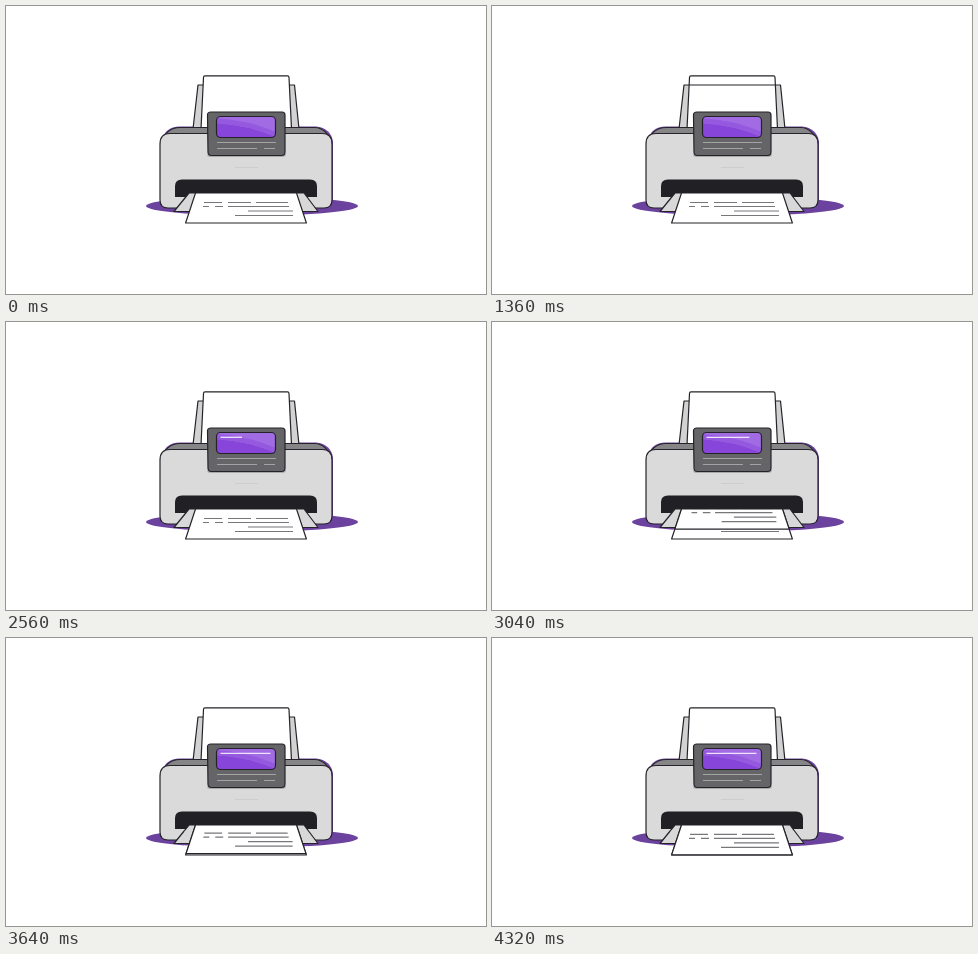
Write an HTML page that moves like this. It is 480 px wide and 288 px high and loops after 4.8 s.

```html
<!DOCTYPE html>
<html lang="en">
<head>
<meta charset="utf-8">
<title>Printer</title>
<style>
  html, body { margin: 0; width: 100%; height: 100%; overflow: hidden; background: #fff; }
  svg { display: block; width: 480px; height: 288px; }
  .ink { stroke: #252329; stroke-width: 1.2; stroke-linejoin: round; }
</style>
</head>
<body>
<svg viewBox="0 0 480 288" fill="none">
  <clipPath id="below"><path d="M150 187H330V230H150Z"/></clipPath>
  <clipPath id="glass"><rect x="210.5" y="110.5" width="59" height="21" rx="4"/></clipPath>

  <ellipse cx="246" cy="200" rx="106" ry="9.5" fill="#6c429f"/>
  <path d="M156 195V135Q158 121 174 120.500H310Q325 122 327 136V196Q326 204 319 205H165Z" fill="#6c429f"/>

  <!-- rear tray and blank paper -->
  <path class="ink" fill="#d2d2d3" d="M192 79H288.500L293 123H187Z"/>
  <path class="ink" fill="#fff" d="M199 69.800H281.500Q283 69.800 283 71.500L285.500 123H195L197.500 71.500Q197.500 69.800 199 69.800Z"/>
  <path id="feed" class="ink"/>

  <!-- body -->
  <path class="ink" fill="#858587" d="M154.500 138Q160 121.500 174 121.500H309Q321 122 325.500 138Z"/>
  <path class="ink" fill="#dadadb" d="M154 138Q154 127.500 164 127.500H316Q326 127.500 326 138V194Q326 202 318 202H162Q154 202 154 194Z"/>
  <path d="M229 161.500H252" stroke="#cdcdce"/>

  <!-- control panel -->
  <path d="M201 148.500Q201 151 205 151H276Q280 151 280 148Z" fill="#aaa"/>
  <path class="ink" fill="#656567" d="M205 106H276Q279 106 279 109V146Q279 149.500 275.500 149.500H205.500Q202 149.500 202 146L201.500 109Q201.500 106 205 106Z"/>
  <g clip-path="url(#glass)">
    <path d="M210 110H270V132H210Z" fill="#8746d9"/>
    <path d="M210 110H270V131Q242 119 210 117Z" fill="#a06be3"/>
    <path d="M210 117Q242 119 270 131V126Q242 114 210 112Z" fill="#9559df"/>
  </g>
  <rect class="ink" x="210.500" y="110.500" width="59" height="21" rx="4"/>
  <path id="status" stroke="#eee3fb" stroke-width="1.300"/>
  <path d="M211 136.500H270M211 142.500H251M258 142.500H269" stroke="#a4a4a6"/>

  <!-- output slot and tray -->
  <path d="M169 191V180Q169 173.500 176 173.500H304Q311 173.500 311 180V191Z" fill="#202025"/>
  <path class="ink" fill="#d8d8d9" d="M183 187H298L312 205.500H168Z"/>
  <g id="old" clip-path="url(#below)"></g>
  <g id="new" clip-path="url(#below)"></g>
</svg>
<script>
const LOOP = 4800;
const $ = id => document.getElementById(id);
const clamp = v => Math.min(1, Math.max(0, v));
const halfWidth = y => 50.5 + (y - 187) * 0.33;

// Rows of writing on the sheet: y, then start and end of each dash
const rows = [
  [196.5, 198, 216, 222, 245, 250, 282],
  [200.5, 197, 203, 209, 217, 222, 283],
  [205, 242, 287],
  [209.500, 229, 287]
];

function sheet(lift) {
  const bottom = 217 - lift, top = 187, w = halfWidth(bottom);
  const outline = `M${240 - halfWidth(top)} ${top}H${240 + halfWidth(top)}` +
    `L${240 + w} ${bottom}H${240 - w}Z`;
  let dashes = '';
  for (const [y, ...ends] of rows) {
    const k = halfWidth(y - lift) / halfWidth(y);
    const at = x => 240 + (x - 240) * k;
    for (let i = 0; i < ends.length; i += 2)
      dashes += `M${at(ends[i])} ${y - lift}H${at(ends[i + 1])}`;
  }
  return `<path class="ink" fill="#fff" d="${outline}"/><path d="${dashes}" stroke="#77777b" stroke-width="1.200"/>`;
}

function draw(t) {
  const slide = 32 * Math.max(0, (t - 1000) / 680) ** 2;
  const y = 70 + slide;
  const inset = slide * 0.04;
  $('feed').setAttribute('d', slide > 0 && y < 123
    ? `M${197.5 - inset} ${y}H${283 + inset}` : '');

  const progress = clamp((t - 2080) / 1120);
  $('status').setAttribute('d', progress > 0 ? `M214.500 115.300h${50 * progress}` : '');

  const lift = 30 * Math.exp(-(t - 2700) * 0.00326);
  $('new').innerHTML = t > 2700 ? sheet(lift) : '';
}

$('old').innerHTML = sheet(0);
function tick() {
  draw(performance.now() % LOOP);
  requestAnimationFrame(tick);
}
tick();
</script>
</body>
</html>
```
